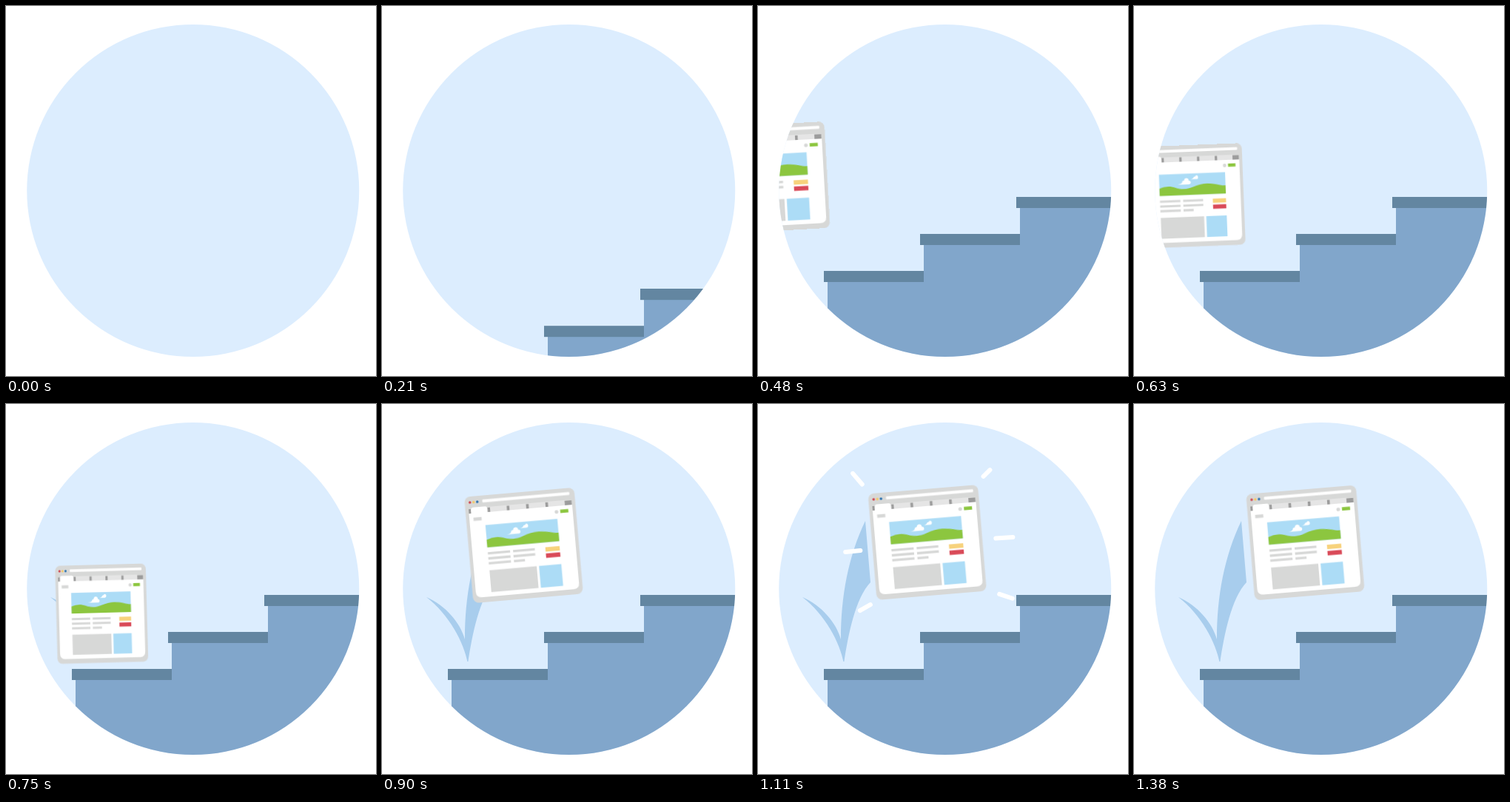
Recreate the animation shown at these times as an HTML page. Size 500 by 500 pixels, loop 2.16 s.

```html
<!DOCTYPE html>
<html lang="en">
<head>
<meta charset="utf-8">
<title>Step up</title>
<style>
html, body { margin: 0; width: 100%; height: 100%; overflow: hidden; background: #fff; }
svg { display: block; width: 100vw; height: 100vh; }

.stairs, .move-x, .move-y, .pose, .reveal, .rays line {
  animation: 2160ms linear infinite;
}

.stairs { animation-name: stairs; }
@keyframes stairs {
  0%, 9.7% { transform: translateY(260px); }
  9.72% { transform: translateY(126px); animation-timing-function: cubic-bezier(.215, .61, .355, 1); }
  19.17%, 100% { transform: translateY(0); }
}

/* Window: slides in, lands on the first step, leaps up */
.move-x { animation-name: move-x; }
@keyframes move-x {
  0%, 16.67% { transform: translateX(-80px); animation-timing-function: cubic-bezier(.3, .4, .6, .8); }
  22.22% { transform: translateX(18.6px); }
  33.33% { transform: translateX(116px); }
  34.72% { transform: translateX(128.8px); }
  41.67% { transform: translateX(191px); animation-timing-function: cubic-bezier(.165, .84, .44, 1); }
  59.72%, 100% { transform: translateX(231.5px); }
}

.move-y { animation-name: move-y; }
@keyframes move-y {
  0%, 22.22% { transform: translateY(232px); animation-timing-function: cubic-bezier(.4, 0, .8, .6); }
  33.33% { transform: translateY(291px); animation-timing-function: ease-in; }
  34.72% { transform: translateY(284px); animation-timing-function: cubic-bezier(.3, .25, .6, .95); }
  41.67% { transform: translateY(191px); animation-timing-function: ease-out; }
  51.39% { transform: translateY(187px); }
  63.89%, 100% { transform: translateY(187.5px); }
}

.pose { animation-name: pose; }
@keyframes pose {
  0%, 22.22% { transform: rotate(-3.2deg) scale(1, 1); animation-timing-function: ease-in; }
  33.33% { transform: rotate(-1.2deg) scale(.82, .9); }
  34.72% { transform: rotate(-1.5deg) scale(.82, .92); animation-timing-function: ease-out; }
  41.67% { transform: rotate(-5deg) scale(1, 1); }
  51.39%, 100% { transform: rotate(-4.8deg) scale(1, 1); }
}

.reveal { stroke-dasharray: 1 2; animation-name: reveal; }
@keyframes reveal {
  0%, 33.4% { stroke-dashoffset: 1.01; }
  41.67%, 100% { stroke-dashoffset: 0; }
}

.rays line { animation-name: burst; }
@keyframes burst {
  0%, 45.8% { opacity: 0; stroke-dasharray: 0 3; stroke-dashoffset: 0; }
  45.83% { opacity: 1; stroke-dasharray: 0 3; stroke-dashoffset: 0; }
  51.39% { opacity: 1; stroke-dasharray: .42 3; stroke-dashoffset: -.24; }
  58.33% { opacity: 1; stroke-dasharray: .31 3; stroke-dashoffset: -.66; }
  63.8% { opacity: 1; stroke-dasharray: 0 3; stroke-dashoffset: -1; }
  63.85%, 100% { opacity: 0; stroke-dasharray: 0 3; stroke-dashoffset: -1; }
}
</style>
</head>
<body>
<svg viewBox="0 0 500 500">
  <defs>
    <clipPath id="disc"><circle cx="252.75" cy="249.5" r="224.5"/></clipPath>
    <mask id="trail" maskUnits="userSpaceOnUse" x="0" y="0" width="500" height="500">
      <path class="reveal" d="M50 250Q104 288 115 345Q116 240 152 145" pathLength="1"
            fill="none" stroke="#fff" stroke-width="64"/>
    </mask>
    <g id="step">
      <rect x="94" y="366" width="420" height="260" fill="#81a6cb"/>
      <rect x="89" y="358" width="135" height="15" fill="#6386a1"/>
    </g>
  </defs>

  <circle cx="252.75" cy="249.5" r="224.5" fill="#dcedfe"/>

  <g clip-path="url(#disc)">
    <g class="stairs">
      <use href="#step"/>
      <use href="#step" x="130" y="-50"/>
      <use href="#step" x="260" y="-100"/>
    </g>

    <path mask="url(#trail)" fill="#a8cded"
          d="M60 261C86 272 106 296 112 318C112 260 122 206 145 158L152 241C132 262 122 310 116 351C111 322 90 284 60 261Z"/>

    <g class="rays" stroke="#fff" stroke-width="6" stroke-linecap="round">
      <line x1="148" y1="117" x2="118" y2="82" pathLength="1"/>
      <line x1="299.5" y1="103" x2="320.5" y2="82" pathLength="1"/>
      <line x1="308" y1="182.3" x2="363" y2="178.8" pathLength="1"/>
      <line x1="316" y1="253.5" x2="358" y2="267.5" pathLength="1"/>
      <line x1="150" y1="197" x2="102" y2="201.5" pathLength="1"/>
      <line x1="160" y1="266.5" x2="126.5" y2="285.5" pathLength="1"/>
    </g>

    <g class="move-x"><g class="move-y"><g class="pose">
      <!-- frame and address bar -->
      <rect x="-74.5" y="-72" width="149" height="144" rx="8" fill="#d7d8d7"/>
      <circle cx="-67.4" cy="-64" r="1.8" fill="#cf4a55"/>
      <circle cx="-62.4" cy="-64" r="1.8" fill="#f3c968"/>
      <circle cx="-57.4" cy="-64" r="1.8" fill="#2f74b0"/>
      <rect x="-50.5" y="-66.4" width="118" height="3.8" rx="1" fill="#fff"/>

      <!-- tabs -->
      <rect x="-70" y="-55" width="139.5" height="7" fill="#9c9c9c"/>
      <path fill="#e5e5e5" d="M-41-48v-8h22.6v8zM-14.8-48v-8h22.6v8zM11.4-48v-8h22.6v8zM37.6-48v-8h22.6v8z"/>
      <path fill="#fff" d="M-67-48v-5.500q0-3.500 3.500-3.500h15.500q3.500 0 3.500 3.500v5.500z"/>

      <!-- page -->
      <path fill="#fff" d="M-70-49H70V57q0 8-8 8H-62q-8 0-8-8z"/>
      <rect x="-64.5" y="-43.200" width="11" height="4.600" fill="#d7d8d7"/>
      <rect x="45.700" y="-43.600" width="4.800" height="4.800" rx="1.800" fill="#d7d8d7"/>
      <rect x="53.200" y="-43.700" width="11" height="4.600" fill="#8cc63f"/>

      <rect x="-49.200" y="-31.700" width="97.600" height="30.200" fill="#acdcf6"/>
      <path fill="#fff" d="M-22-16.500q5-.5 6.500-2.500q0-3 3-2.800q.5-4 4-3.500q3 .5 2.800 3.600q3 .2 3 2.600q0 2.600-3.300 2.600z"/>
      <path fill="#fff" d="M-2.500-23.500q3-.4 4-2q.4-2 2.500-1.600q.6-2 2.600-1.600q2 .5 1.700 2.500q.2 2.700-2.300 2.700z"/>
      <path fill="#8cc63f" d="M-49.200-11.800C-40-15-33-15-26-12.500S-11-8.500 0-12.500S20-17.500 30-16S43-12.500 48.400-13V-1.500H-49.200z"/>

      <path fill="none" stroke="#d7d8d7" stroke-width="3.300"
            d="M-49.200 6.700h30.200M-15 6.700h29.500M-49.200 13.500h30.200M-15 13.500h29.500M-49.200 20.200h30.200M-15 20.200h15"/>
      <rect x="28.800" y="5.200" width="19.400" height="6" fill="#f7d27c"/>
      <rect x="28.800" y="13.600" width="19.400" height="6" fill="#d94a58"/>
      <rect x="-49" y="29.600" width="64" height="29.600" fill="#d7d8d7"/>
      <rect x="18.200" y="29.600" width="30.200" height="29.600" fill="#acdcf6"/>
    </g></g></g>
  </g>
</svg>
</body>
</html>
```
